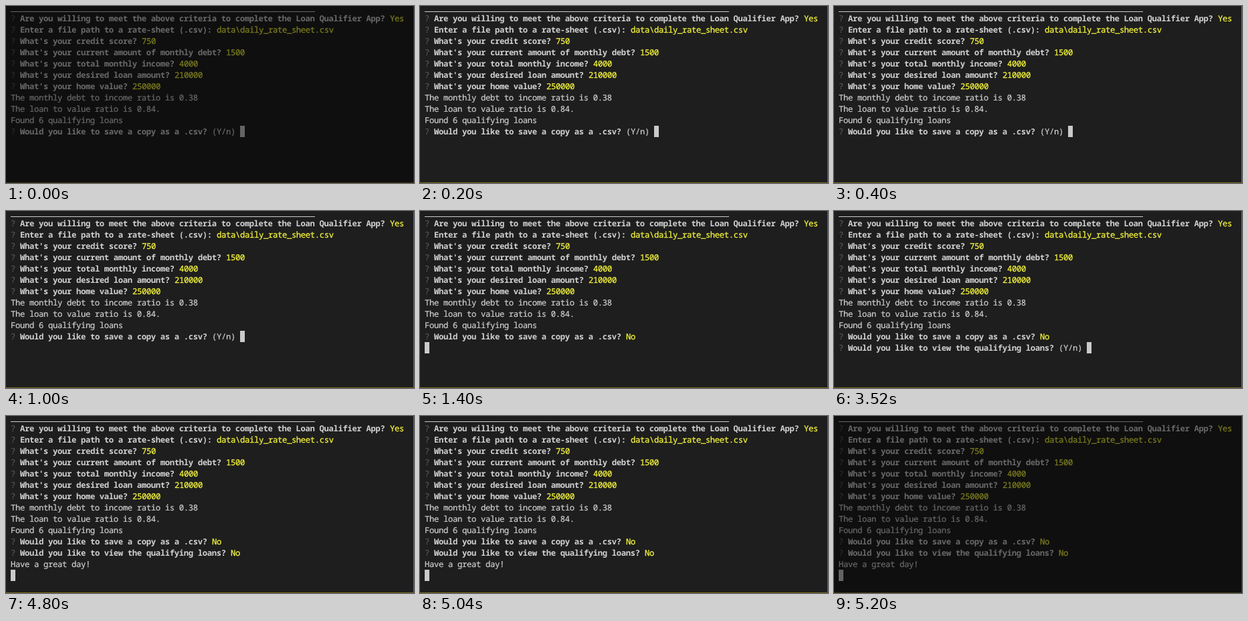
Recreate the animation shown at these times as an HTML page. Size 610 by 266 pixels, loop 5.4 s.

```html
<!DOCTYPE html>
<html lang="en">
<head>
<meta charset="utf-8">
<title>Loan prompt</title>
<style>
  html, body { margin: 0; width: 100%; height: 100%; overflow: hidden; background: #1e1e1e; }
  svg { display: block; width: 100vw; height: 100vh; }
  text {
    font: 12.2px "Noto Sans Mono", "DejaVu Sans Mono", monospace;
    letter-spacing: calc(7px - 0.6em);
    fill: #cfcfcf;
    stroke: #cfcfcf;
    stroke-width: 0.22px;
    white-space: pre;
    text-rendering: geometricPrecision;
  }
  .mark { fill: #626262; stroke: none; }
  .ask { font-weight: 700; fill: #d2d2d2; stroke: none; }
  .answer { fill: #f3f33c; stroke: #f3f33c; stroke-width: 0.3px; }
</style>
</head>
<body>
<svg id="stage" viewBox="0 0 610 266" preserveAspectRatio="none">
  <rect width="610" height="266" fill="#1e1e1e"/>
  <rect x="7" y="8" width="455" height="1" fill="#cccccc"/>
  <path d="M0 265.5H609.5V0" fill="none" stroke="#776a1e"/>
  <g id="lines"></g>
  <rect id="cursor" width="7" height="17" fill="#cacaca"/>
  <rect id="shade" width="610" height="266" fill="#000" opacity="0.5"/>
</svg>
<script>
const LOOP = 5400, CELL = 7, ROW = 17, LEFT = 7, TOP = 10;
const NS = "http://www.w3.org/2000/svg";
const byId = id => document.getElementById(id);
const lines = byId("lines"), cursor = byId("cursor"), shade = byId("shade");

const SAVE = "Would you like to save a copy as a .csv?";
const VIEW = "Would you like to view the qualifying loans?";

// Each line is [question, answer] or a plain string.
const intro = [
  ["Are you willing to meet the above criteria to complete the Loan Qualifier App?", "Yes"],
  ["Enter a file path to a rate-sheet (.csv):", "data\\daily_rate_sheet.csv"],
  ["What's your credit score?", "750"],
  ["What's your current amount of monthly debt?", "1500"],
  ["What's your total monthly income?", "4000"],
  ["What's your desired loan amount?", "210000"],
  ["What's your home value?", "250000"],
  "The monthly debt to income ratio is 0.38",
  "The loan to value ratio is 0.84.",
  "Found 6 qualifying loans"
];

const steps = [
  { at: 0, tail: [[SAVE]] },
  { at: 1400, tail: [[SAVE, "No"], ""] },
  { at: 1600, tail: [[SAVE, "No"], [VIEW]] },
  { at: 4800, tail: [[SAVE, "No"], [VIEW, "No"], "Have a great day!", ""] }
];

// Writes a run of text and returns the column after it.
function write(str, col, row, kind = "plain") {
  const el = document.createElementNS(NS, "text");
  el.setAttribute("x", LEFT + col * CELL);
  el.setAttribute("y", TOP + row * ROW + 13);
  el.setAttribute("class", kind);
  el.textContent = str;
  lines.append(el);
  return col + str.length;
}

function writeLine(line, row) {
  if (typeof line === "string") return write(line, 0, row);
  const [ask, answer] = line;
  write("?", 0, row, "mark");
  const col = write(ask, 2, row, "ask") + 1;
  return answer ? write(answer, col, row, "answer") : write("(Y/n)", col, row) + 1;
}

function showStep(step) {
  lines.replaceChildren();
  let col = 0;
  const all = [...intro, ...step.tail];
  all.forEach((line, row) => { col = writeLine(line, row); });
  cursor.setAttribute("x", LEFT + col * CELL);
  cursor.setAttribute("y", TOP + (all.length - 1) * ROW);
}

let shown = null;
function draw(t) {
  const step = steps.filter(s => t >= s.at).pop();
  if (step !== shown) showStep(shown = step);
  shade.style.display = t < 200 || t >= 5200 ? "" : "none";
}

const start = performance.now();
function tick() {
  draw((performance.now() - start) % LOOP);
  requestAnimationFrame(tick);
}
tick();
</script>
</body>
</html>
```
